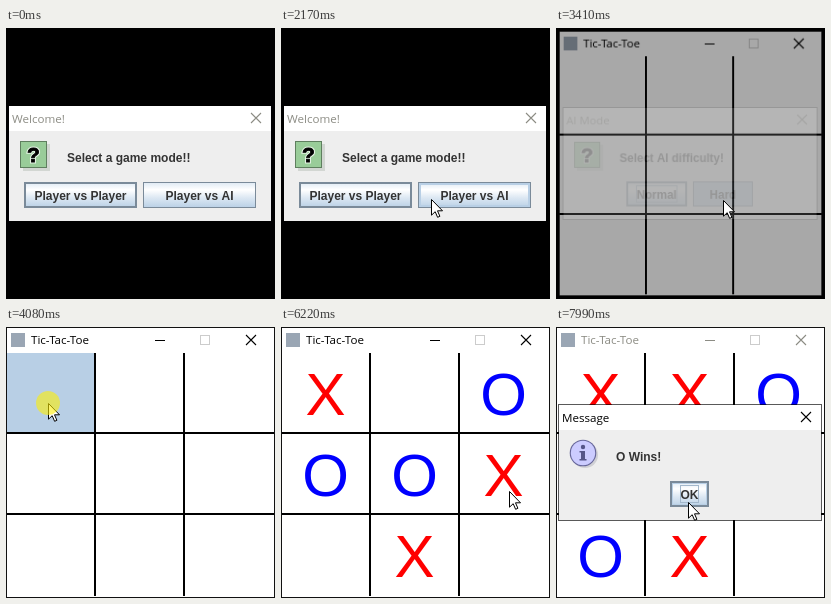
An HTML page with a canvas for the animation above (8.65 s loop, 269 by 271 pixels).

```html
<!DOCTYPE html>
<html lang="en">
<head>
<meta charset="utf-8">
<title>Tic-Tac-Toe</title>
<style>
  html, body { margin: 0; width: 100%; height: 100%; overflow: hidden; background: #000; }
  canvas { display: block; }
</style>
</head>
<body>
<canvas id="stage" width="269" height="271"></canvas>
<script>
const W = 269, H = 271, LOOP = 8650, TICK = 70;
const stage = document.getElementById('stage').getContext('2d');
const buffer = document.createElement('canvas');
buffer.width = W;
buffer.height = H;
const g = buffer.getContext('2d');

const TITLE_FONT = '11.6px "Open Sans", "Noto Sans", sans-serif';
const LABEL_FONT = 'bold 12px "Liberation Sans", Arial, sans-serif';
const MARK_FONT = '60px "Liberation Sans", Arial, sans-serif';
const STEEL = '#7a8a99', SKY = '#b8cfe5', IDLE = '#8c8c84';

// Pointer moves: start, end, x, y and an optional bend point
const START = [253, 271];
const MOVES = [
  [590, 1410, 167, 188], [1480, 1550, 162, 181], [1700, 1700, 161, 180],
  [1970, 2170, 150, 171], [2580, 2650, 161, 173], [2720, 2780, 178, 177],
  [2980, 3050, 167, 172], [3480, 3950, 42, 76], [4290, 4900, 144, 226],
  [5240, 5880, 219, 148, 205, 80], [6150, 6220, 228, 164],
  [6290, 6770, 149, 62], [7050, 7460, 134, 181],
  [7660, 7660, 132, 178], [7990, 7990, 132, 175]
];
const CLICKS = [2300, 3210, 4080, 5030, 5950, 6840];
// Turns: press time, cell of X, cell of O
const TURNS = [[4080, 0, 4], [5030, 7, 3], [5950, 5, 2], [6840, 1, 6]];

const during = (t, from, length) => t >= from && t < from + length;
const ease = p => p * p * (3 - 2 * p);

function level(t, start, levels) {
  const i = Math.floor((t - start) / TICK);
  return levels[Math.min(i, levels.length - 1)];
}
const opening = (t, start) => t < start ? 0 : level(t, start, [.3, .66, .94, 1]);
const closing = (t, start) => t < start ? 1 : level(t, start, [.6, .15, 0]);

function pointerAt(t) {
  let [x, y] = START;
  for (const [from, to, nx, ny, bx, by] of MOVES) {
    if (t < from) break;
    const steps = Math.round((to - from) / 75);
    const done = t >= to ? steps : Math.floor((t - from) / (to - from) * steps);
    const p = ease((done + 1) / (steps + 1)), q = 1 - p;
    const mx = bx ?? (x + nx) / 2, my = by ?? (y + ny) / 2;
    x = q * q * x + 2 * p * q * mx + p * p * nx;
    y = q * q * y + 2 * p * q * my + p * p * ny;
  }
  return [Math.round(x), Math.round(y)];
}

function box(x, y, w, h, color) {
  g.fillStyle = color;
  g.fillRect(x, y, w, h);
}

function frame(x, y, w, h, color, width = 1) {
  g.strokeStyle = color;
  g.lineWidth = width;
  g.strokeRect(x + width / 2, y + width / 2, w - width, h - width);
}

function text(str, x, y, font, color, align = 'left') {
  g.font = font;
  g.fillStyle = color;
  g.textAlign = align;
  g.fillText(str, x, y);
}

function closeCross(x, y, color) {
  g.strokeStyle = color;
  g.lineWidth = 1.1;
  g.beginPath();
  g.moveTo(x, y);
  g.lineTo(x + 10, y + 10);
  g.moveTo(x + 10, y);
  g.lineTo(x, y + 10);
  g.stroke();
}

function button(label, x, w, { main, focus, hover, pressed } = {}) {
  const y = 154, h = 26;
  const fill = g.createLinearGradient(0, y, 0, y + h);
  fill.addColorStop(0, '#dde8f3');
  fill.addColorStop(.3, '#fff');
  fill.addColorStop(.6, '#dde8f3');
  fill.addColorStop(1, SKY);
  box(x, y, w, h, pressed ? SKY : fill);
  if (hover) frame(x + 1, y + 1, w - 2, h - 2, SKY, 2);
  frame(x, y, w, h, STEEL, main ? 2 : 1);
  if (focus) frame(x + 10, y + 4, w - 20, h - 8, '#a3b8cc');
  text(label, x + w / 2, 172, LABEL_FONT, '#333', 'center');
}

function questionIcon() {
  box(17, 116, 27, 27, '#d2d6d2');
  box(14, 113, 27, 27, '#99cc99');
  frame(14, 113, 27, 27, '#5f7f5f');
  g.font = 'bold 21px "Liberation Sans", Arial, sans-serif';
  g.textAlign = 'center';
  g.strokeStyle = '#e4f2e4';
  g.lineWidth = 3;
  g.strokeText('?', 27.5, 134);
  text('?', 27.5, 134, g.font, '#000', 'center');
  g.strokeStyle = '#000';
  g.lineWidth = .8;
  g.strokeText('?', 27.5, 134);
}

function disc(x, y, r, color) {
  g.fillStyle = color;
  g.beginPath();
  g.arc(x, y, r, 0, 7);
  g.fill();
}

function infoIcon() {
  disc(29, 128, 13, '#d0d0d4');
  disc(27, 126, 13.3, '#666699');
  disc(27, 126, 12.2, '#ccccff');
  disc(27, 120, 2.2, '#555588');
  box(25, 124, 4, 9, '#555588');
  box(23.5, 124, 3, 1.5, '#555588');
  box(23.5, 132, 7, 1.5, '#555588');
}

function dialog(title, message, messageX, active, icon) {
  const color = active ? '#000' : IDLE;
  frame(2, 77, 264, 117, 'rgba(0,0,0,.65)');
  box(3, 78, 262, 115, '#eee');
  box(3, 78, 262, 25, '#fff');
  text(title, 6, 94.5, TITLE_FONT, color);
  closeCross(245, 85, color);
  icon();
  text(message, messageX, 134, LABEL_FONT, '#333');
}

function welcomeDialog(t) {
  dialog('Welcome!', 'Select a game mode!!', 61, false, questionIcon);
  button('Player vs Player', 18, 113, { main: true });
  button('Player vs AI', 137, 113, { hover: t >= 1970, pressed: during(t, 2300, TICK) });
}

function levelDialog(t) {
  dialog('AI Mode', 'Select AI difficulty!', 61, t < 3340, questionIcon);
  button('Normal', 68, 63, { main: true, focus: true });
  button('Hard', 137, 62, { hover: t >= 2580, pressed: t >= 3210 });
}

function resultDialog(t) {
  dialog('Message', 'O Wins!', 60, true, infoIcon);
  button('OK', 114, 39, { main: true, focus: true, hover: t >= 7460 });
}

function mark(symbol, cell, color) {
  const col = cell % 3, row = Math.floor(cell / 3);
  text(symbol, 44.5 + 89 * col, 88 + 81 * row, MARK_FONT, color, 'center');
}

function gameWindow(t) {
  const color = t < 6980 ? '#000' : IDLE;
  box(0, 0, W, H, '#fff');
  box(5, 6, 14, 14, '#9aa6b4');
  text('Tic-Tac-Toe', 25, 17, TITLE_FONT, color);
  box(149, 13, 10, 1, color);
  frame(194, 8, 10, 10, '#ccc');
  closeCross(240, 8, color);

  for (const [press, x] of TURNS) {
    if (during(t, press, TICK)) {
      box(1 + 89 * (x % 3), 26 + 81 * Math.floor(x / 3), 88, 80, SKY);
    }
  }
  for (const i of [0, 1]) {
    box(88 + 89 * i, 26, 2, 243, '#000');
    box(1, 105 + 81 * i, 267, 2, '#000');
  }
  for (const [press, x, o] of TURNS) {
    if (t < press + TICK) continue;
    mark('X', x, '#f00');
    mark('O', o, '#00f');
  }
  frame(0, 0, W, H, '#111');
}

// Composites a whole window so that it fades and scales as one
function layer(draw, t, alpha, scale) {
  if (!alpha) return;
  g.clearRect(0, 0, W, H);
  draw(t);
  stage.globalAlpha = alpha;
  stage.drawImage(buffer, W / 2 * (1 - scale), H / 2 * (1 - scale), W * scale, H * scale);
  stage.globalAlpha = 1;
}
const openLayer = (draw, t, start) => {
  const a = opening(t, start);
  layer(draw, t, a, .94 + .06 * a);
};
const closeLayer = (draw, t, start) => {
  const a = closing(t, start);
  layer(draw, t, a, .96 + .04 * a);
};

const ARROW = new Path2D('M.5 .5V16.2L4.2 12.7L6.6 18.3L8.9 17.3L6.5 11.8H11.5Z');

function pointer(t) {
  if (t < 590) return;
  const [x, y] = pointerAt(t);
  stage.save();
  stage.translate(x, y);
  stage.fillStyle = '#fff';
  stage.fill(ARROW);
  stage.strokeStyle = '#000';
  stage.lineWidth = 1;
  stage.stroke(ARROW);
  if (CLICKS.some(c => during(t, c, TICK))) {
    stage.fillStyle = 'rgba(255,240,0,.58)';
    stage.beginPath();
    stage.arc(0, 0, 12, 0, 7);
    stage.fill();
  }
  stage.restore();
}

function render(t) {
  stage.fillStyle = '#000';
  stage.fillRect(0, 0, W, H);
  openLayer(gameWindow, t, 3340);
  closeLayer(welcomeDialog, t, 2440);
  if (t < 3340) openLayer(levelDialog, t, 2510);
  else closeLayer(levelDialog, t, 3340);
  openLayer(resultDialog, t, 6980);
  pointer(t);
}

const began = performance.now();
function tick() {
  render((performance.now() - began) % LOOP);
  requestAnimationFrame(tick);
}
tick();
</script>
</body>
</html>
```
